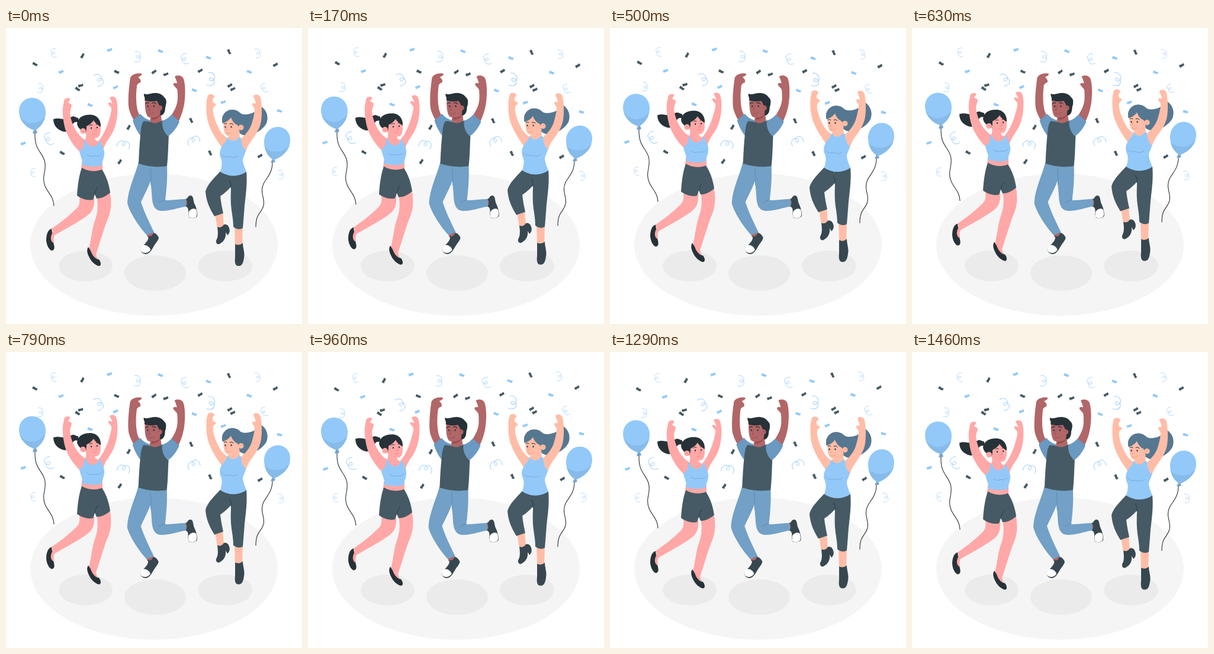
Write an HTML page with a canvas that moves like this. It is 500 px wide and 500 px high and loops after 1.5 s.

```html
<!DOCTYPE html>
<html lang="en">
<head>
<meta charset="utf-8">
<title>Celebration</title>
<style>
html, body { margin: 0; width: 100%; height: 100%; overflow: hidden; background: #fff; }
canvas { display: block; width: 500px; height: 500px; }
</style>
</head>
<body>
<canvas id="stage"></canvas>
<script>
const LOOP = 1500;
const BLUE = '#92c9f9', BLUE_SHADE = '#86bbea', BLUE_DARK = '#75a3cc';
const JEANS = '#72a0c6', SLEEVE = '#6a99c2';
const SLATE = '#455a64', INK = '#263238', BOOT = '#37474f', HAIR = '#567790';
const ROSE = '#ffa8a7', ROSE_DARK = '#f07e80', PEACH = '#ffbda7', PEACH_DARK = '#eb996e';
const BROWN = '#b16668', BROWN_DARK = '#9a4a4d';

const canvas = document.getElementById('stage');
const ctx = canvas.getContext('2d');
const ratio = window.devicePixelRatio || 1;
canvas.width = canvas.height = 500 * ratio;

// A part is a filled path, or a stroked one when a width is given.
const part = (color, d, width) => ({ color, path: new Path2D(d), width });

function draw(parts) {
  for (const { color, path, width } of parts) {
    if (width) {
      ctx.strokeStyle = color;
      ctx.lineWidth = width;
      ctx.stroke(path);
    } else {
      ctx.fillStyle = color;
      ctx.fill(path);
    }
  }
}

const dot = (color, x, y, rx, ry = rx) =>
  part(color, `M${x - rx} ${y}a${rx} ${ry} 0 1 0 ${2 * rx} 0a${rx} ${ry} 0 1 0 ${-2 * rx} 0Z`);

const floor = [
  dot('#f5f5f5', 250, 366, 209, 120),
  dot('#ebebeb', 134.5, 402, 45.5, 26),
  dot('#ebebeb', 252, 414, 52, 30),
  dot('#ebebeb', 370, 402, 46, 26)
];

const balloons = [
  part(INK, 'M49 178C48 206 60 208 65 224C70 240 59 250 66 267C71 279 80 284 81 300', 1.1),
  part(BLUE_DARK, 'M48 170L45 178Q49 180 53 177L50 170Z'),
  part(BLUE, 'M44 118C57 118 67 128 67 143C67 157 58 168 49 173C37 170 22 157 22 141C22 128 31 118 44 118Z'),
  part(BLUE_SHADE, 'M23 148C31 163 52 167 66 149C64 160 57 168 49 173C37 170 26 161 23 148Z'),
  part(INK, 'M450 227C450 245 441 252 435 263C428 278 438 288 435 300C432 313 422 312 422 336', 1.1),
  part(BLUE_DARK, 'M451 220L447 227Q451 229 455 226L452 220Z'),
  part(BLUE, 'M460 167C473 168 481 178 480 191C479 207 465 219 452 223C442 217 436 207 436 193C436 178 446 167 460 167Z'),
  part(BLUE_SHADE, 'M437 201C447 212 468 212 479 198C475 210 464 219 452 223C444 218 439 211 437 201Z')
];

const ponytailWoman = [
  // ponytail, legs and shoes
  part(INK, 'M80 154C88 151 94 154 99 154C104 155 107 151 111 150C114 148 117 151 122 152L123 160C116 156 111 162 112 168C113 173 104 176 97 175C87 172 80 165 80 154Z'),
  part(ROSE, 'M124 284C125 296 124 300 119 305C105 319 90 330 77 339L82 350C101 339 122 328 137 317C148 309 150 300 149 284Z'),
  part(ROSE, 'M153 283C156 300 155 312 150 326C145 340 144 358 140 373L152 382C158 365 162 350 169 330C177 312 180 300 175 274Z'),
  part(ROSE, 'M75 340L83 349C79 353 81 360 81 365C76 363 73 355 75 340Z'),
  part(ROSE, 'M141 371L152 380C152 385 154 388 156 392C148 391 142 382 141 371Z'),
  part(INK, 'M77 339C70 341 68 350 68 359C69 369 74 376 78 376C83 375 82 368 80 363C76 361 74 354 78 347Z'),
  part(INK, 'M139 370C136 374 137 380 140 386C144 395 151 401 157 402C161 402 161 396 157 391C153 391 148 387 145 381Q143 375 139 370Z'),
  // torso and arms
  part(ROSE, 'M128 226L163 226L163 241Q145 247 127 240Z'),
  part(ROSE, 'M98 124C98 119 104 117 108 119C109 121 106 124 105 126C107 127 110 128 111 130C111 134 108 138 108 143C109 155 114 167 120 176C126 184 132 189 137 190L128 212C117 203 108 190 102 176C97 164 95 145 96 134Z'),
  part(ROSE, 'M175 118C178 114 185 116 186 120C188 125 189 135 188 146C187 158 184 170 178 180C173 188 167 195 164 207L155 192C163 184 168 172 172 162C175 152 179 140 178 135C175 131 172 129 173 126C175 125 178 127 180 128C178 124 177 121 175 118Z'),
  part(ROSE, 'M135 174L150 182C150 189 151 190 157 192L152 203L136 203L130 191C135 190 136 186 135 174Z'),
  part(BLUE, 'M132 190L135 190C137 198 143 201 148 200C153 199 156 196 157 191L160 192C161 197 165 203 166 209C167 220 162 224 162 232C150 235 138 234 128 231C131 224 125 216 124 208C129 204 133 200 132 190Z'),
  part(BLUE_DARK, 'M137 214Q143 219 150 216Q157 218 162 213', .8),
  part(SLATE, 'M128 236C139 243 152 243 162 239C170 251 174 264 176 278C168 285 160 288 153 288L150 281L147 290C138 292 128 289 120 283C121 267 123 250 128 236Z'),
  part(INK, 'M150 281Q151 274 155 269', .7),
  // head
  part(ROSE, 'M128 160L148 154L159 163C161 172 160 182 155 185C148 188 140 184 135 179Z'),
  part(INK, 'M120 162C121 151 131 146 142 146.500C153 146 161 155 160 167C155 164 151 161 148 156C144 162 138 165 136 166C136 170 136 174 134 177C128 174 121 169 120 162Z'),
  dot(ROSE, 130, 174, 4.8),
  part(ROSE_DARK, 'M128 173Q131 172 132 176M151 168L153 174L150 174M147 179Q150 181 153 178', .8),
  part(INK, 'M141 165Q143 162 146 164M152 163Q154 161 157 163', 1),
  dot(INK, 144, 169, 1.1, 1.5),
  dot(INK, 154, 168, 1.1, 1.5)
];

const man = [
  // legs and shoes
  part(BROWN, 'M236 346L247 341L250 350Q244 357 238 353Z'),
  part(BROWN, 'M300 289L307 288L308 303L300 301Z'),
  part(JEANS, 'M223 226L250 234C247 255 236 275 227 294C232 310 241 328 249 345L237 350C224 336 208 312 204 296C205 272 217 250 223 226Z'),
  part(JEANS, 'M240 230L271 231C272 255 270 275 268 291C280 291 292 289 303 289L304 301C290 304 275 309 262 309C251 309 247 300 246 290C245 275 244 262 240 230Z'),
  part('#5c86aa', 'M243 237Q245 250 244 265M268 290Q262 291 257 295', .8),
  part(BOOT, 'M239 351C241 356 237 362 230 368C225 374 226 381 235 382C242 381 245 375 249 368C252 363 257 358 257 354C255 349 251 346 248 346C246 352 243 353 239 351Z'),
  part('#fff', 'M230 367C236 365 243 371 243 375C239 381 232 381 228 378C226 375 227 370 230 367Z'),
  part(BOOT, 'M303 289C306 288 306 283 311 283C316 284 315 290 317 296C321 304 323 313 322 318C319 322 312 322 308 320C306 315 308 308 306 304L303 301Q307 295 303 289Z'),
  part('#fff', 'M307.5 311C310 305 318 304 320.5 307C322 313 322 318 319 320C314 322 310 321 307.5 319Z'),
  // arms, sleeves and vest
  part(BROWN, 'M209 84C211 78 222 75 228 77C230 79 225 82 222 83C225 85 228 89 226 92C223 93 220 95 220 99C218 115 219 128 221 138C223 146 227 150 230 152L217 160C212 150 207 142 206 132C205 115 207 98 209 84Z'),
  part(BROWN, 'M284 82C288 79 297 80 299 86C302 95 302 110 301 120C300 134 296 147 290 159L276 151C285 138 289 128 289 118C289 108 289 104 287 102C284 98 281 97 282 94C284 92 287 94 288 93C287 89 286 86 284 82Z'),
  part(SLEEVE, 'M213 156L226 145C231 151 236 154 243 156L228 184C221 176 216 166 213 156Z'),
  part(SLATE, 'M232 157C240 159 258 159 264 156C272 160 274 168 274 180C273 198 273 215 271 233C255 236 238 234 223 229C224 205 225 190 227 172C228 165 229 160 232 157Z'),
  part(SLEEVE, 'M263 157C271 154 275 150 279 146L292 158C288 168 281 177 273 183C266 177 262 167 263 157Z'),
  part(BROWN, 'M244 146L260 143L262 156C256 162 246 162 242 157Z'),
  part(BROWN_DARK, 'M245 151Q255 152 260 145Q258 154 245 155Z'),
  // head
  part(INK, 'M250 114L267 118C270 121 270 128 268 134C268 141 266 146 261 148L252 140Z'),
  part(BROWN, 'M234 119C233 135 235 146 239 150C246 153 255 150 259 146C261 142 259 132 258 120L252 117Z'),
  part(INK, 'M233 122C235 118 231 115 232 111C239 114 245 109 254 110C262 111 265 115 267 118C271 121 270 128 268 133L258 136C259 130 256 127 254 123C247 125 239 124 233 122Z'),
  dot(BROWN, 259, 135, 4.2),
  part(BROWN_DARK, 'M257 135Q260 132 261 135M242 132L240 139L243 139M240 144Q245 147 249 143', .9),
  part(INK, 'M235 128Q238 125 240 127M246 127Q249 125 252 128', 1.2),
  dot(INK, 238.5, 132, 1.2, 1.6),
  dot(INK, 249, 132, 1.2, 1.6)
];

const longHairWoman = [
  // hair behind, legs and boots
  part(HAIR, 'M366 161C362 149 371 138 382 138C391 138 394 146 404 146C414 146 424 141 430 132C441 138 444 151 440 161C433 174 419 179 411 181C403 183 397 180 393 176L380 151Z'),
  part(PEACH, 'M353 314L366 311L368 335L357 338Z'),
  part(PEACH, 'M386 335L400 336L399 367L387 367Z'),
  part(BOOT, 'M357 336C361 338 366 336 368 332C373 331 376 334 377 338C379 343 377 348 374 350L371 345C372 353 369 360 362 364C358 367 354 364 355 359C359 353 358 344 357 336Z'),
  part(BOOT, 'M387 365C391 367 396 367 400 363C400 372 404 380 402 388C401 396 399 402 393 402C387 402 386 396 387 387Z'),
  part(SLATE, 'M362 242C374 250 386 251 392 249C388 262 372 278 362 284C363 294 365 304 367 313L352 318C344 305 338 292 337 276C340 264 352 253 362 242Z'),
  part(SLATE, 'M380 247C390 250 400 247 406 242C408 262 405 282 403 300C402 313 401 327 400 338C395 341 389 340 384 336C384 322 381 312 380 298C379 280 381 265 380 247Z'),
  part(INK, 'M380 270Q381 261 377 257', .8),
  // arms and torso
  part(PEACH, 'M341 114C345 110 352 112 352 117C349 119 348 123 350 126C353 128 356 128 354 131C350 133 349 137 350 143C352 155 358 168 364 177C368 182 373 186 377 187L366 204C356 190 345 173 341 158C338 147 338 130 339 122Z'),
  part(PEACH, 'M418 115C421 111 428 112 430 118C432 128 433 145 431 157C429 170 422 180 414 191C409 198 406 204 405 210L394 189C404 182 412 171 415 162C418 152 420 143 420 137C419 133 415 131 416 128C418 126 421 128 422 127C421 122 419 119 418 115Z'),
  part(PEACH, 'M379 180L394 172L395 186L388 196L378 194L374 186Z'),
  part(BLUE, 'M375 184C378 193 389 192 394 184L397 186C397 196 401 203 405 207C404 214 400 218 400 224C401 231 404 238 406 243C392 252 377 252 362 243C365 232 366 226 362 218C359 208 364 199 371 192Z'),
  part(BLUE_DARK, 'M364 213Q370 220 377 217Q385 221 392 216', .8),
  // head
  part(PEACH, 'M368 157L380 149L398 163C398 172 392 180 385 183C378 185 371 182 369 176C367 170 367 164 368 157Z'),
  part(HAIR, 'M366 161C362 149 371 138 382 138C394 138 401 147 402 158C403 166 399 172 394 174C394 169 393 166 391 164C386 162 382 157 380 151C376 157 371 159 366 161Z'),
  dot(PEACH, 397, 168, 4.6),
  part(PEACH_DARK, 'M396 168Q398 165 400 168M374 167L371 172L374 173M372 177Q376 180 380 177', .8),
  part(INK, 'M368 162Q370 160 373 162M378 162Q381 160 384 163', 1),
  dot(INK, 370.5, 167, 1.1, 1.5),
  dot(INK, 380.5, 167, 1.1, 1.5)
];

// Confetti pieces: x, y, angle in degrees.
const darkPieces = [
  [49, 61, 30], [129, 47, -60], [187, 74, 25], [250, 74, -35], [270, 78, -20], [328, 72, -30],
  [377, 40, 65], [455, 62, -30], [121, 103, 35], [126, 97, -15], [207, 168, -60], [313, 156, 65],
  [192, 226, -55], [95, 211, 30], [345, 211, 65], [429, 216, -30], [383, 103, -25], [378, 97, -30]
];
const bluePieces = [
  [93, 74, -20], [175, 37, -20], [261, 39, 20], [342, 50, 20], [411, 74, 20], [185, 100, -25],
  [142, 130, 20], [318, 105, 20], [367, 125, -20], [462, 140, 15], [29, 195, -20]
];
// Curls: x, y, angle in degrees, scale.
const curls = [
  [81, 42, 180, .8], [58, 102, 15, .8], [157, 88, -15, 1.1], [222, 49, 10, .95], [302, 52, 170, .95],
  [346, 87, 15, 1.15], [425, 43, 0, .8], [436, 101, 165, .8], [72, 187, 165, 1.1], [46, 244, 185, .75],
  [199, 197, -70, 1.1], [317, 190, -105, 1.1], [464, 248, 0, .8]
];
const flake = part(SLATE, 'M-4.4-1.4C-2-3.2 1-.2 4-2.4L4.5 1.4C1 3.4-2 1-3.8 3Z');
const blueFlake = { ...flake, color: BLUE };
const curl = part(BLUE, 'M-6-9C1-12 7-5 4 0C2 3-3 2-2-1C-1-4 6-2 6 3C6 7 2 10-4 9', .8);

function scatter(shape, places) {
  for (const [x, y, angle, scale = 1] of places) {
    ctx.save();
    ctx.translate(x, y);
    ctx.rotate(angle * Math.PI / 180);
    ctx.scale(scale, scale);
    draw([shape]);
    ctx.restore();
  }
}

// The standard "ease" curve, cubic-bezier(.25, .1, .25, 1).
function ease(x) {
  const bezier = (a, b, s) => 3 * a * s * (1 - s) ** 2 + 3 * b * s * s * (1 - s) + s ** 3;
  let low = 0, high = 1;
  for (let i = 0; i < 20; i++) {
    const mid = (low + high) / 2;
    if (bezier(.25, .25, mid) < x) low = mid; else high = mid;
  }
  return bezier(.1, 1, low);
}

const shakeStops = [0, -1, 2, -4, 4, -4, 4, -4, 2, -1, 0];
function shake(p) {
  const i = Math.floor(p * 10);
  const from = shakeStops[i];
  return from + (shakeStops[i + 1] - from) * ease(p * 10 - i);
}

const bob = p => -10 * (1 - Math.abs(1 - 2 * p));
const sway = p => p < .25 ? 4 * p : p < .75 ? 2 - 4 * p : 4 * p - 4;

function moved(dx, dy, paint) {
  ctx.save();
  ctx.translate(dx, dy);
  paint();
  ctx.restore();
}

function frame(now) {
  const p = now % LOOP / LOOP;
  ctx.setTransform(ratio, 0, 0, ratio, 0, 0);
  ctx.lineCap = ctx.lineJoin = 'round';
  ctx.fillStyle = '#fff';
  ctx.fillRect(0, 0, 500, 500);
  draw(floor);

  moved(249, 141, () => {
    ctx.rotate(sway(p) * Math.PI / 180);
    ctx.translate(-249, -141);
    scatter(curl, curls);
    scatter(flake, darkPieces);
    scatter(blueFlake, bluePieces);
  });
  moved(0, bob(p), () => {
    draw(balloons);
    draw(ponytailWoman);
    draw(longHairWoman);
  });
  moved(1 + shake(p), 0, () => draw(man));
}

const start = performance.now();
function tick() {
  frame(performance.now() - start);
  requestAnimationFrame(tick);
}
tick();
</script>
</body>
</html>
```
